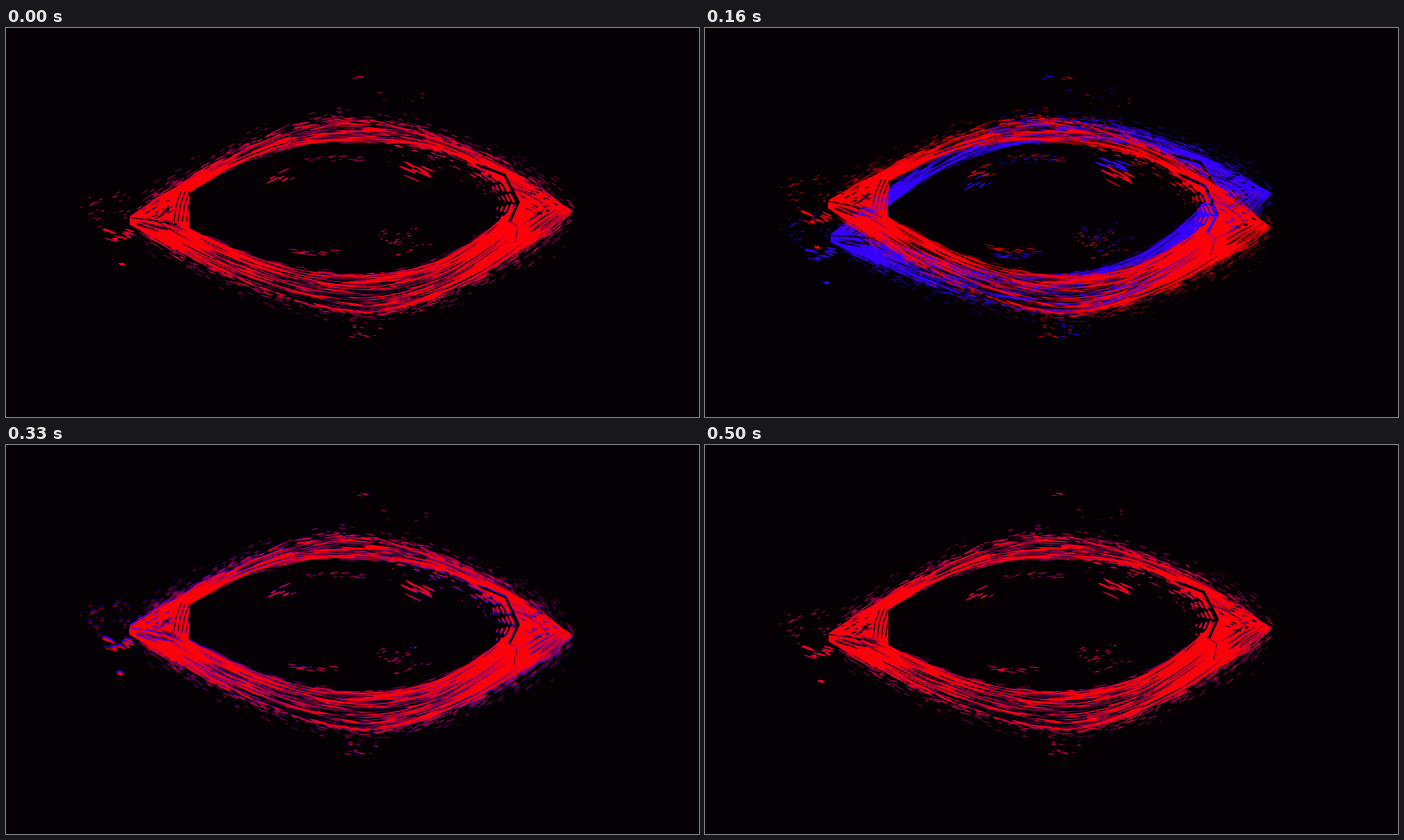
Write an HTML page with a canvas that moves like this. It is 998 by 561 pixels and loops after 660 ms.

```html
<!DOCTYPE html>
<html lang="en">
<head>
<meta charset="utf-8">
<title>Eye</title>
<style>
html, body { margin: 0; width: 100%; height: 100%; overflow: hidden; background: #000; }
canvas { display: block; width: 100vw; height: 100vh; }
</style>
</head>
<body>
<canvas id="stage" width="998" height="561"></canvas>
<script>
const W = 998, H = 561, SCALE = 2, CX = 498, CY = 256;
const RED = '#fd0009', BLUE = '#3500ff', NIGHT = '#040004';
const LOOP = 660;

// Each pose is held until its end time; angles in degrees
const POSES = [
  { end: 80, red: 0, blue: 0 },
  { end: 160, red: 1.4, blue: -9.3 },
  { end: 200, red: 4.2, blue: -4.7 },
  { end: 290, red: 7, blue: 0 },
  { end: 330, red: 2.1, blue: 4.6 },
  { end: 410, red: 1.8, blue: 2.3 },
  { end: 500, red: 1.4, blue: 0 },
  { end: LOOP, red: 0, blue: 0 }
];

function seeded(seed) {
  return () => {
    seed = (seed + 0x6d2b79f5) | 0;
    let t = Math.imul(seed ^ (seed >>> 15), 1 | seed);
    t = (t + Math.imul(t ^ (t >>> 7), 61 | t)) ^ t;
    return ((t ^ (t >>> 14)) >>> 0) / 4294967296;
  };
}

// Lid edge: a power curve falling away from its peak to either end
function arch(peak, left, right) {
  return x => {
    const end = x < peak.x ? left : right;
    const s = Math.abs((x - peak.x) / (end.x - peak.x));
    return peak.y + (end.y - peak.y) * s ** end.power;
  };
}

const upper = {
  side: -1,
  out: arch({ x: 480, y: 135 }, { x: 182, y: 269, power: 1.5 }, { x: 827, y: 273, power: 1.9 }),
  in: arch({ x: 495, y: 163 }, { x: 262, y: 240, power: 2.3 }, { x: 742, y: 250, power: 3 })
};
const lower = {
  side: 1,
  out: arch({ x: 520, y: 409 }, { x: 174, y: 281, power: 1.55 }, { x: 800, y: 274, power: 1.75 }),
  in: arch({ x: 500, y: 357 }, { x: 250, y: 280, power: 1.95 }, { x: 734, y: 254, power: 2.4 })
};

function makeEye(color) {
  const layer = document.createElement('canvas');
  layer.width = W * SCALE;
  layer.height = H * SCALE;
  const g = layer.getContext('2d'), rnd = seeded(41);
  const range = (a, b) => a + (b - a) * rnd();
  g.scale(SCALE, SCALE);
  g.fillStyle = g.strokeStyle = color;

  const ink = () => g.globalCompositeOperation = 'source-over';
  const carve = () => g.globalCompositeOperation = 'destination-out';

  function trace(pts) {
    g.beginPath();
    pts.forEach(p => g.lineTo(p[0], p[1]));
  }
  function line(width, ...pts) {
    g.lineWidth = width;
    trace(pts);
    g.stroke();
  }
  function between(top, bottom, x0, x1) {
    const above = [], below = [];
    for (let x = x0; x <= x1; x += 2) {
      above.push([x, top(x)]);
      below.unshift([x, Math.max(top(x), bottom(x))]);
    }
    trace([...above, ...below]);
    g.fill();
  }
  // A sliver centred on x along y = f(x), pointed at both ends
  function streak(f, x, len, width) {
    const half = px => width / 2 * Math.sqrt(Math.max(0, 1 - (2 * (px - x) / len) ** 2));
    between(px => f(px) - half(px), px => f(px) + half(px), x - len / 2, x + len / 2);
  }
  // Streaks inside a lid, densest in the middle and towards the outer edge
  function grain(lid, n, len, width) {
    for (let i = 0; i < n; i++) {
      const v = 1.08 * rnd() ** .75;
      const x = 235 + 490 * (rnd() + rnd()) / 2;
      streak(px => lid.in(px) + (lid.out(px) - lid.in(px)) * v, x, len * range(.3, 1.4), width * range(.5, 1.2));
    }
  }
  // Streaks beside an edge, thinning out with distance
  function fringe(edge, n, x0, x1, reach, len, width) {
    for (let i = 0; i < n; i++) {
      const x = range(x0, x1), far = -Math.log(1 - rnd() * .97);
      const d = reach * far * (.7 + Math.abs(x - CX) / 500);
      const fade = 1 / (1 + far * .5);
      streak(px => edge(px) + d, x, len * range(.4, 1.4) * fade, width * range(.6, 1.3) * fade);
    }
  }
  // Short slanted dashes spread over an ellipse
  function flecks(n, x, y, rx, ry, slope, len, width) {
    for (let i = 0; i < n; i++) {
      const a = range(0, 2 * Math.PI), r = Math.sqrt(rnd());
      const px = x + rx * r * Math.cos(a), py = y + ry * r * Math.sin(a);
      const tilt = slope + range(-.1, .1);
      streak(q => py + (q - px) * tilt, px, len * range(.4, 1.4), width * range(.5, 1.2));
    }
  }

  between(upper.out, lower.out, 178, 812);
  carve();
  between(upper.in, lower.in, 264, 738);
  grain(upper, 120, 46, 1.4);
  grain(lower, 330, 52, 1.5);
  // Hatching in the two corners
  flecks(22, 218, 257, 22, 16, -.4, 11, 2);
  flecks(20, 222, 284, 30, 8, .3, 26, 1.4);
  flecks(22, 768, 250, 25, 18, .3, 10, 2.2);
  flecks(24, 785, 278, 32, 14, -.7, 24, 1.4);
  flecks(20, 765, 232, 40, 14, .6, 28, 1.3);
  for (let x = 243; x < 262; x += 6)
    line(1.6, [x + 9, 236], [x + 2, 256], [x - 1, 279]);
  line(1.4, [176, 273], [214, 278], [246, 283]);
  line(1, [722, 277], [737, 286], [733, 310]);
  line(4, [676, 197], [700, 205], [718, 212], [738, 251], [726, 278]);

  ink();
  // Nested contours beside the right corner
  for (let d = 0; d < 24; d += 6) {
    g.setLineDash([14 - d / 2, 3 + d / 2]);
    line(3.4 - d / 9, [690 - d, 207 + d / 3], [712 - d, 214 + d / 3], [731 - d, 250], [719 - d, 278 - d / 3]);
  }
  g.setLineDash([]);

  for (const lid of [upper, lower]) {
    fringe(lid.out, 330, 200, 815, lid.side * 8, 20, 1.3);
    fringe(lid.in, 60, 275, 690, -lid.side * 2.5, 34, 1.1);
  }
  fringe(lower.out, 50, 730, 815, 13, 18, 1.4);
  fringe(upper.in, 60, 550, 710, 13, 12, 2);

  // Debris left of the eye
  flecks(26, 150, 262, 45, 26, -.4, 7, 1.1);
  flecks(12, 163, 298, 18, 12, .35, 15, 2.2);
  flecks(4, 168, 340, 5, 2, .2, 8, 2);

  // Flecks inside the eye
  flecks(12, 592, 206, 18, 12, .5, 18, 3);
  flecks(7, 395, 216, 20, 11, -.45, 15, 2);
  flecks(14, 475, 188, 50, 5, -.1, 12, .9);
  flecks(12, 445, 323, 45, 6, .15, 12, 1.2);
  flecks(24, 572, 307, 42, 24, -.3, 7, 1.3);

  // Far flecks above and below
  flecks(3, 505, 71, 11, 2, .2, 10, 1.5);
  flecks(8, 565, 97, 55, 14, .15, 6, .8);
  flecks(10, 512, 437, 34, 10, .15, 8, 1.3);
  return layer;
}

const ctx = document.getElementById('stage').getContext('2d');
ctx.imageSmoothingQuality = 'high';
const redEye = makeEye(RED), blueEye = makeEye(BLUE);

function place(eye, degrees) {
  ctx.save();
  ctx.translate(CX, CY);
  ctx.rotate(degrees * Math.PI / 180);
  ctx.drawImage(eye, -CX, -CY, W, H);
  ctx.restore();
}

function draw(ms) {
  const pose = POSES.find(p => ms < p.end);
  ctx.fillStyle = '#000';
  ctx.fillRect(0, 0, W, H);
  ctx.fillStyle = NIGHT;
  ctx.fillRect(0, 0, W, H - 1);
  place(blueEye, pose.blue);
  place(redEye, pose.red);
}

const start = performance.now();
function tick() {
  draw(Math.max(0, performance.now() - start) % LOOP);
  requestAnimationFrame(tick);
}
draw(0);
requestAnimationFrame(tick);
</script>
</body>
</html>
```
